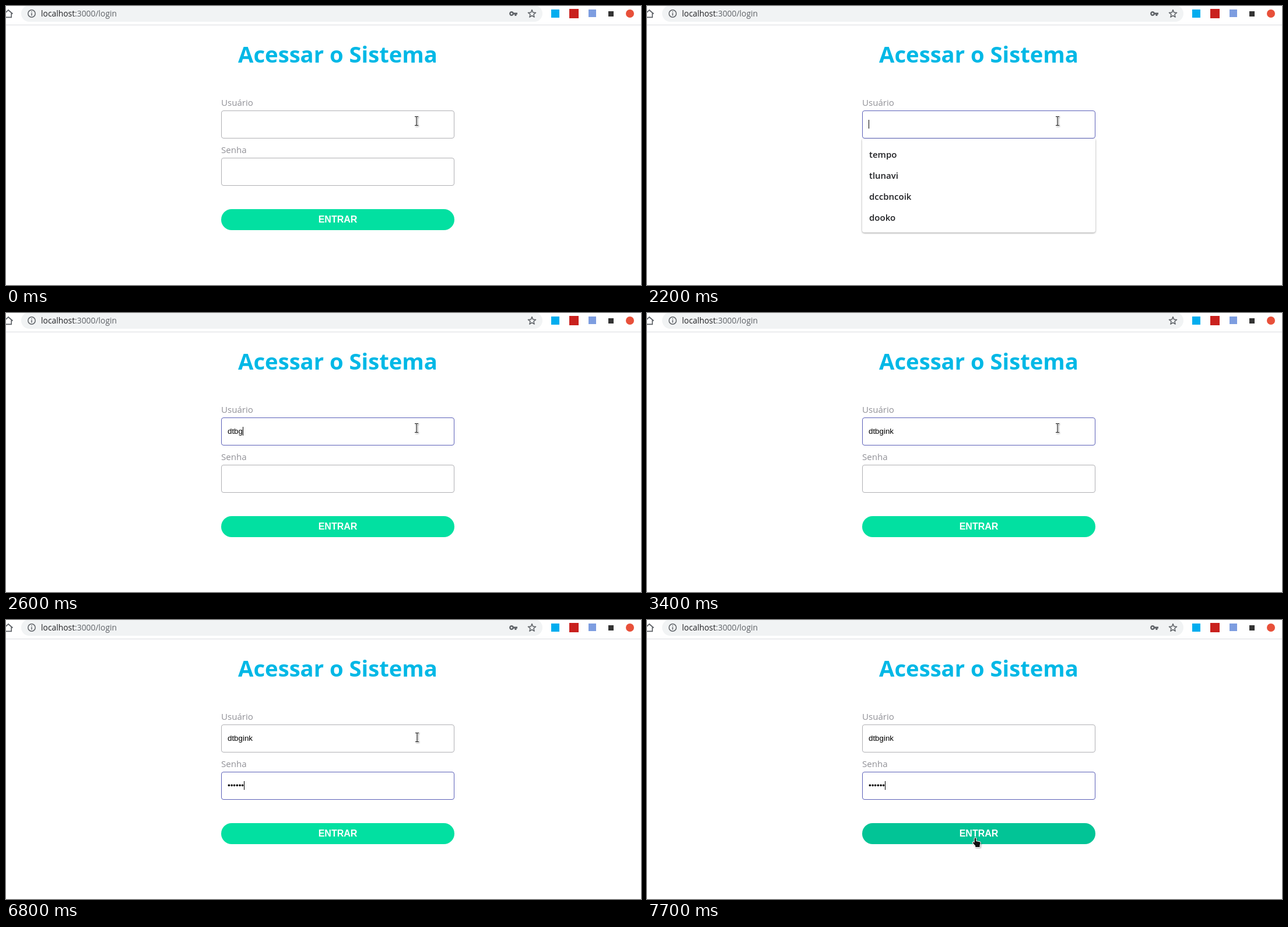
Write an HTML page that moves like this. It is 1089 px wide and 478 px high and loops after 8 s.

```html
<!DOCTYPE html>
<html lang="pt">
<head>
<meta charset="utf-8">
<title>Acessar o Sistema</title>
<style>
  html, body { margin: 0; width: 100%; height: 100%; overflow: hidden; background: #fff; }
  svg { display: block; width: 1089px; height: 478px; }
  text { font-family: "Open Sans", "Noto Sans", sans-serif; white-space: pre; }
  .label { font-size: 15.1px; fill: #909096; }
  .typed { font: 13.333px "Liberation Sans", Arial, sans-serif; fill: #000; }
  .option { font-size: 15px; font-weight: 600; fill: #202124; }
  .field { fill: #fff; stroke-width: 1; }
  .menu { filter: drop-shadow(0 1px 1.5px rgba(0, 0, 0, .4)); }
  .pointer { filter: drop-shadow(1px 1.5px 1px rgba(0, 0, 0, .35)); }
  .outlined { stroke: #fff; stroke-width: 2; paint-order: stroke; stroke-linejoin: round; }
</style>
</head>
<body>
<svg viewBox="0 0 1089 478">
  <rect width="1089" height="478" fill="#fff"/>

  <!-- browser bar -->
  <rect x="26" y="-1" width="894" height="28" rx="14" fill="#f1f3f4"/>
  <rect y="32" width="1089" height="1" fill="#dadce0"/>
  <path d="M-3 13.5 4 7l7.5 6.5M9.2 12v7.3H-1" fill="none" stroke="#5f6368" stroke-width="1.7"/>
  <g stroke="#5f6368" fill="none" stroke-width="1.5">
    <circle cx="44" cy="13" r="6.2"/>
    <path d="M44 12v4.5M44 9.2v1.6"/>
  </g>
  <text x="60" y="18" font-size="13.86" fill="#202124">localhost<tspan fill="#5f6368">:3000/login</tspan></text>
  <path id="key" fill="#5f6368" fill-rule="evenodd"
    d="M870.8 11.5h6.2v3h-1.6v2.5h-3v-2.5h-1.6a4 4 0 1 1 0-3zM867 11.5a1.5 1.5 0 1 0 0 3a1.5 1.5 0 0 0 0-3z"/>
  <path id="star" fill="none" stroke="#5f6368" stroke-width="1.5" stroke-linejoin="round"/>
  <rect x="935" y="6" width="14" height="14" fill="#00adef"/>
  <rect x="966" y="5" width="16" height="16" fill="#c9211e"/>
  <rect x="999" y="6" width="13" height="13" fill="#7d9de0"/>
  <rect x="1033" y="9" width="9" height="9" fill="#333"/>
  <circle cx="1070" cy="13" r="7" fill="#e8503a"/>

  <!-- form -->
  <text x="569" y="97" text-anchor="middle" font-size="38.2" font-weight="700" fill="#00b8e6">Acessar o Sistema</text>
  <text class="label" x="369" y="171">Usuário</text>
  <text class="label" x="369" y="252">Senha</text>
  <rect class="field" id="userBox" x="369.5" y="179.5" width="399" height="47" rx="3.5"/>
  <rect class="field" id="passBox" x="369.5" y="260.5" width="399" height="47" rx="3.5"/>
  <text class="typed" id="user" x="380" y="207"></text>
  <text class="typed" id="pass" x="380" y="288"></text>
  <rect id="button" x="369" y="348" width="400" height="36" rx="18"/>
  <text x="569" y="371" text-anchor="middle" fill="#fff"
    style="font: bold 16px 'Liberation Sans', Arial, sans-serif">ENTRAR</text>

  <g id="menu">
    <path class="menu" id="menuBox" fill="#fff"/>
    <g id="options"></g>
  </g>
  <rect id="caret" width="1" height="15" fill="#000"/>

  <!-- pointers, each with its hot spot at 0,0 -->
  <g id="beam" class="pointer">
    <path d="M-3-7.5h2.2l.8.6.8-.6H3M-3 7.5h2.2l.8-.6.8.6H3M0-7V7" fill="none" stroke="#fff" stroke-width="2.6"/>
    <path d="M-3-7.5h2.2l.8.6.8-.6H3M-3 7.5h2.2l.8-.6.8.6H3M0-7V7" fill="none" stroke="#111" stroke-width="1.1"/>
  </g>
  <g id="arrow" class="pointer">
    <path class="outlined" d="M0 0v14l3.2-3 2.3 5.3 2.3-1-2.3-5.1h4.4z" fill="#111"/>
  </g>
  <g id="hand" class="pointer">
    <path class="outlined" fill="#111"
      d="M-1.3 1Q0-.6 1.3 1v5l6.2 1.2Q9 7.7 8.7 9.5L7.6 13v3H.2v-2.3L-4 9.2q-.6-1.5 1-1.7l1.7 1z"/>
  </g>
</svg>
<script>
const LOOP = 8000;
const USER = 'dtbgink';
const ACCOUNTS = ['tempo', 'tlunavi', 'dccbncoik', 'dooko'];
const FOCUS = [91, 96, 184], IDLE = [176, 176, 180];
const $ = id => document.getElementById(id);
const show = (el, on) => el.setAttribute('display', on ? 'inline' : 'none');
const place = (el, attrs) => Object.entries(attrs).forEach(([k, v]) => el.setAttribute(k, v));
const mix = k => `rgb(${IDLE.map((c, i) => Math.round(c + (FOCUS[i] - c) * k))})`;

// Value of the latest [time, value] step that has begun.
const at = (steps, t) => steps.reduce((v, [start, next]) => t >= start ? next : v, steps[0][1]);

const userLength = [[0, 0], [2400, 1], [2500, 3], [2600, 4], [2700, 6], [2800, 7]];
const passLength = [[0, 0], [5000, 2], [5100, 3], [5200, 5], [5300, 6]];
const userFocus = [[0, 0], [1100, 1], [3800, .5], [3900, 0]];
const passFocus = [[0, 0], [3800, .5], [3900, 1]];
const caretOn = [[0, 0], [1100, 1], [1600, 0], [2200, 1], [3400, 0], [3800, 1],
  [5900, 0], [6800, 1], [7200, 0], [7700, 1]];
const pointer = [[0, [704, 197]], [6800, [705, 201]], [6900, [701, 222]], [7000, [686, 270]],
  [7100, [658, 328]], [7200, [622, 372]], [7300, [592, 392]], [7400, [572, 382]], [7500, [563, 373]]];

$('star').setAttribute('d', 'M' + Array.from({ length: 10 }, (_, i) => {
  const r = i % 2 ? 3 : 6.9, a = (i / 5 - .5) * Math.PI;
  return (902 + r * Math.cos(a)).toFixed(1) + ' ' + (13.5 + r * Math.sin(a)).toFixed(1);
}).join('L') + 'Z');

const rows = ACCOUNTS.map((_, i) => {
  const row = document.createElementNS('http://www.w3.org/2000/svg', 'text');
  place(row, { class: 'option', x: 381, y: 260 + 36 * i });
  return $('options').appendChild(row);
});

function drawMenu(t) {
  const open = t >= 1100 && t < 2500;
  show($('menu'), open);
  if (!open) return;
  const list = t < 2400 ? ACCOUNTS : ACCOUNTS.filter(name => name[0] === USER[0]).reverse();
  rows.forEach((row, i) => { row.textContent = list[i] || ''; });
  $('menuBox').setAttribute('d', `M369 228h400v${list.length * 36 + 12}q0 4-4 4h-392q-4 0-4-4z`);
}

function drawPointer(t) {
  const [x, y] = at(pointer, t);
  const inField = (y > 179 && y < 227) || (y > 260 && y < 308);
  const onButton = y >= 348 && y < 384;
  const kind = inField ? 'beam' : onButton ? 'hand' : 'arrow';
  for (const id of ['beam', 'arrow', 'hand']) show($(id), id === kind);
  $(kind).setAttribute('transform', `translate(${x} ${y})`);
  $('button').setAttribute('fill', onButton ? '#02c496' : '#02e0a1');
}

function render(t) {
  $('user').textContent = USER.slice(0, at(userLength, t));
  $('pass').textContent = '•'.repeat(at(passLength, t));
  $('userBox').setAttribute('stroke', mix(at(userFocus, t)));
  $('passBox').setAttribute('stroke', mix(at(passFocus, t)));
  show($('key'), t < 2400 || t >= 5100);
  drawMenu(t);

  const active = t < 3800 ? $('user') : $('pass');
  const width = active.textContent ? active.getComputedTextLength() : 0;
  place($('caret'), { x: Math.round(380 + width), y: t < 3800 ? 195 : 276 });
  show($('caret'), at(caretOn, t));
  drawPointer(t);
}

const begin = performance.now();
function tick() {
  render((performance.now() - begin) % LOOP);
  requestAnimationFrame(tick);
}
tick();
</script>
</body>
</html>
```
